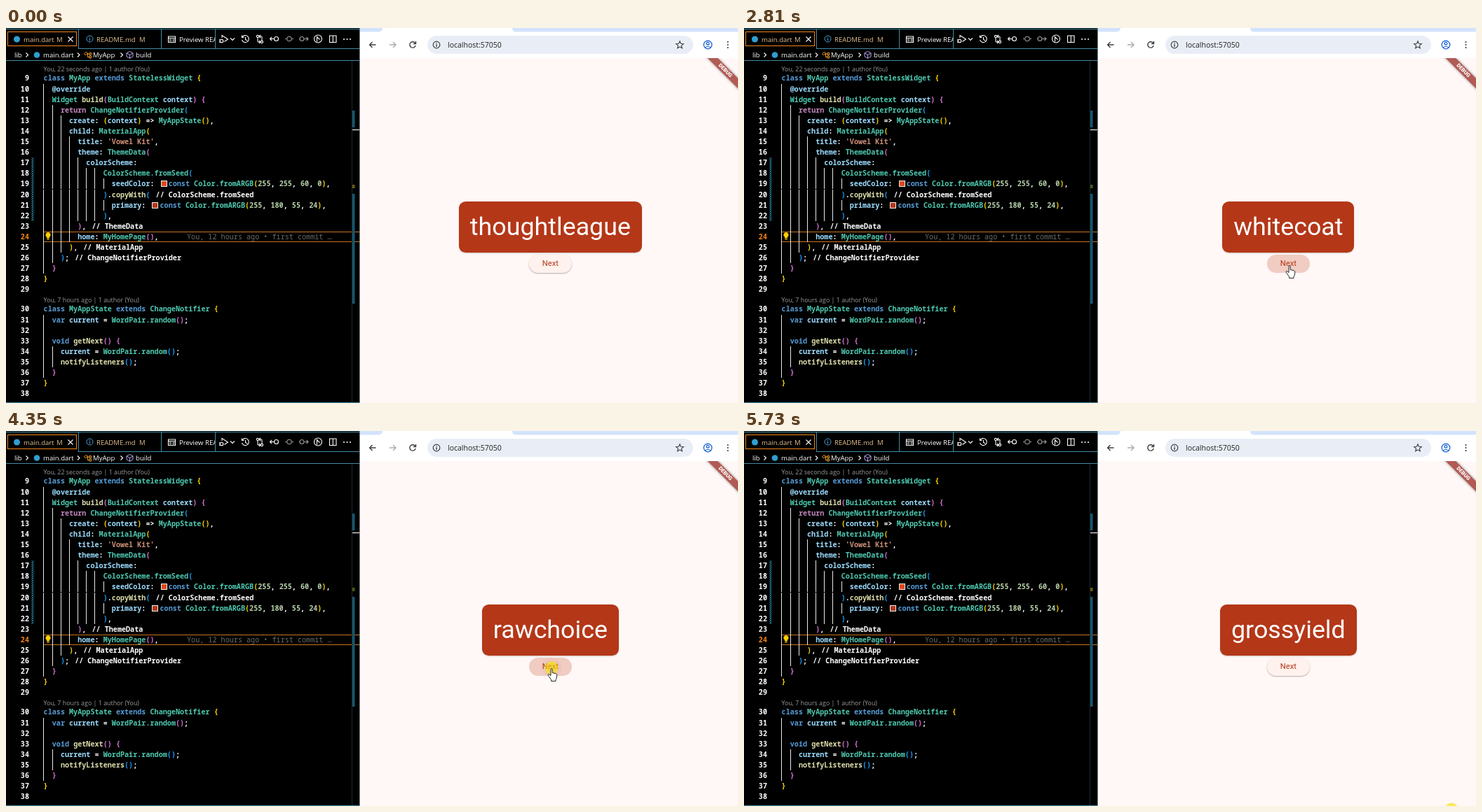
An HTML page for the animation above (5.92 s loop, 1044 px wide and 536 px high).

```html
<!DOCTYPE html>
<html lang="en">
<head>
<meta charset="utf-8">
<title>Word pair demo</title>
<style>
  html, body { margin: 0; width: 100%; height: 100%; overflow: hidden; background: #000; }
  #stage { position: relative; width: 1044px; height: 536px; overflow: hidden; background: #000; }
  #stage > * { position: absolute; }
  #code { left: 0; top: 0; }
  #code div { position: absolute; left: 53.6px; white-space: pre; color: #fff;
    font: 600 10.15px/15.1px "Noto Sans Mono", "DejaVu Sans Mono", monospace; }
  #code div.num { left: 0; width: 33px; text-align: right; font-weight: 700; }
  #code div.blame { left: 258px; color: #6a6a6a; font-weight: 500; }
  #code i { position: absolute; width: 1px; height: 15.1px; background: #e8e8e8; }
  #code .sw { display: inline-block; box-sizing: border-box; width: 9px; height: 9px;
    margin: 0 2px 0 3px; border: 1px solid #eee; vertical-align: -1px; }
  .kw { color: #569cd6; } .ret { color: #c586c0; } .type { color: #4ec9b0; }
  .fn { color: #dcdcaa; } .var { color: #9cdcfe; } .str { color: #ce9178; }
  .n { color: #b5cea8; } .b0 { color: #ffd700; } .b1 { color: #da70d6; } .b2 { color: #179fff; }
  .note { margin-left: 2px; }
  #page { left: 505px; top: 43px; width: 539px; height: 493px; background: #fff8f6; overflow: hidden; }
  #banner { position: absolute; left: 481px; top: 13.4px; width: 80px; height: 9.6px;
    transform: rotate(45deg); background: #b25a54; box-shadow: 0 0 4px rgba(0,0,0,.5);
    color: #fff; text-align: center; font: 900 7.6px/9.6px Roboto, sans-serif; }
  #app { left: 576.4px; top: 248px; width: 400px; display: flex; flex-direction: column; align-items: center; }
  #card { padding: 15.9px; border-radius: 9.6px; background: #b43718; color: #fff;
    box-shadow: 0 1px 2px rgba(0,0,0,.22); font: 400 35.8px/41.4px Roboto, sans-serif; }
  #next { position: relative; margin-top: 3.3px; width: 61.4px; height: 25.6px; border-radius: 13px;
    overflow: hidden; background: #fff1ed; color: #b43718; text-align: center;
    font: 400 11.2px/25.6px Roboto, sans-serif; }
  #tint, #ripple { position: absolute; background: #b43718; opacity: 0; }
  #tint { inset: 0; }
  #ripple { width: 72px; height: 72px; left: -3.4px; top: -22px; border-radius: 50%; }
  #pointer { left: 0; top: 0; overflow: visible; }
  svg text { font-family: "Open Sans", "Noto Sans", sans-serif; font-size: 9.6px; fill: #fff; }
  svg .lens { font-size: 8.9px; fill: #999; }
  svg .mod { fill: #e2c08d; }
  .line { fill: none; stroke: #fff; stroke-width: 1.1; }
  .dark { fill: none; stroke: #3c4043; stroke-width: 1.4; }
</style>
</head>
<body>
<div id="stage">
  <svg width="1044" height="536">
    <defs>
      <pattern id="hatch" width="3" height="3" patternUnits="userSpaceOnUse">
        <path d="M0 3L3 0" stroke="#2a9dc0" stroke-width="1.2"/>
      </pattern>
    </defs>

    <!-- editor frame and tabs -->
    <path d="M0 1.5H505M103 29.5H505M103.5 1V30M221.5 1V30M298.5 1V30M0 46.5H505M0 535.5H505" fill="none" stroke="#428ca4"/>
    <path d="M504.5 0V536" stroke="#7f9099"/>
    <rect x="2.500" y="5.500" width="98" height="20" fill="none" stroke="#f38518"/>
    <circle cx="15.500" cy="16" r="4.500" fill="#2f9fd0"/>
    <text class="mod" x="25" y="19.500">main.dart</text>
    <text class="mod" x="72" y="19.500">M</text>
    <path class="line" d="M88.500 12.500l7 7m0-7l-7 7"/>
    <circle cx="119.500" cy="15.500" r="4.500" fill="none" stroke="#4aa3d8"/>
    <path d="M119.500 13v1.200M119.500 15v3.300" stroke="#4aa3d8"/>
    <text class="mod" x="129" y="19.500">README.md</text>
    <text class="mod" x="190" y="19.500">M</text>
    <path class="line" d="M231.500 12h10v8.500h-10zM231.500 14.500h10M233 16.500h3m1.500 0h3M233 18.500h3m1.500 0h3"/>
    <svg x="224" y="2" width="74" height="27"><text x="23" y="17.500">Preview README.md</text></svg>

    <!-- editor actions -->
    <g class="line">
      <path d="M308 14v-3.500l8.500 5.500-5 3.500M320 14.500l3 3 3-3"/>
      <circle cx="307.500" cy="18.500" r="2.300"/><path d="M304 16.500l1.500 1M304 20.500l1.500-1"/>
      <path d="M337 13a5 5 0 1 1-.5 4M336.500 10.500v3h3M341.500 13v3.500l2.500 1.500"/>
      <circle cx="359" cy="12" r="1.600"/><circle cx="365" cy="20" r="1.600"/>
      <path d="M359 14v5q0 1 1 1h2.500m-1.500-2l2 2-2 2M365 18v-5q0-1-1-1h-2.500m1.500-2l-2 2 2 2"/>
      <circle cx="385.500" cy="15.500" r="3"/><path d="M382 15.500h-5m2-2.500l-2.500 2.500 2.500 2.500"/>
      <g stroke="#999"><circle cx="404" cy="15.500" r="3.200"/><path d="M398 15.500h2.500m7 0h2.500"/>
      <circle cx="422" cy="15.500" r="3"/><path d="M418 15.500h1m6.500 0h5m-2-2.500l2.500 2.500-2.500 2.500"/></g>
      <circle cx="445" cy="15.500" r="5.500"/><path d="M443.500 11.500v8M443.500 13l4 3.500"/>
      <path d="M461.500 11h9.500v9.500h-9.500zM466.300 11v9.500"/>
    </g>
    <path d="M482 16h.01m4.500 0h.01m4.500 0h.01" stroke="#fff" stroke-width="2" stroke-linecap="round"/>

    <!-- breadcrumb -->
    <text x="12" y="42">lib</text>
    <circle cx="44" cy="38.500" r="4.300" fill="#2f9fd0"/>
    <text x="53" y="42">main.dart</text>
    <text x="124" y="42">MyApp</text>
    <text x="185" y="42">build</text>
    <path class="line" d="M28.500 35.500l3 3-3 3M102 35.500l3 3-3 3M163.500 35.500l3 3-3 3"/>
    <path d="M111.500 37l3-3 2 2-3 3zM115 37h4.500M116.500 37v4.500h3M119 35.500h2.500v3H119zM119 40h2.500v3H119z" fill="none" stroke="#ee9d28"/>
    <path d="M176.500 33.500l4.500 2.300v5l-4.500 2.500-4.500-2.500v-5zM172 36l4.500 2.300 4.500-2.300M176.500 38.300v5" fill="none" stroke="#b9a3e8"/>

    <!-- editor margins -->
    <text class="lens" x="53.500" y="62">You, 22 seconds ago | 1 author (You)</text>
    <text class="lens" x="53.500" y="392.200">You, 7 hours ago | 1 author (You)</text>
    <rect x="36.500" y="185" width="3" height="91" fill="url(#hatch)"/>
    <path d="M53 291.500H504M53 305.500H504" stroke="#c87420"/>
    <path d="M493.500 47V535" stroke="#1c2a30"/>
    <path d="M494 118h3.500v24h-3.500zM494 237h3.500v157h-3.500z" fill="#17566e"/>
    <path d="M494 145.500h10" stroke="#ccc" stroke-width="1.500"/>
    <rect id="mark" x="494" y="224" width="3.500" height="5"/>

    <!-- browser chrome -->
    <path d="M505 0h539v43H505z" fill="#fff"/>
    <path d="M505 0h32q0 5-6 5.500H505zM722 0h322v5.500H728q-6 0-6-5.500z" fill="#d3e3fd"/>
    <rect x="601" y="11" width="379" height="26" rx="13" fill="#e9eef6"/>
    <g class="dark">
      <path d="M527.500 24h-9m4-4l-4 4 4 4"/>
      <path d="M547 24h9m-4-4l4 4-4 4" stroke="#a9acb0"/>
      <path d="M583.800 22a4.200 4.200 0 1 0 .3 3M584.500 19v3.500H581"/>
      <circle cx="614" cy="24" r="4.800" stroke-width="1.200"/>
      <path d="M614 21v1.300M614 23.300v3.700"/>
      <path d="M961 18.800l1.500 3.500 3.800.3-2.900 2.500.9 3.700-3.300-2-3.300 2 .9-3.700-2.900-2.500 3.800-.3z" stroke-width="1.100"/>
      <g stroke="#0b57d0" stroke-width="1.200"><circle cx="1001" cy="24" r="5.800"/><circle cx="1001" cy="22.300" r="1.900"/><path d="M997 28q4-3 8 0"/></g>
    </g>
    <path d="M1029.500 20v.01m0 4v.01m0 4v.01" stroke="#3c4043" stroke-width="2.200" stroke-linecap="round"/>
    <text x="630" y="27.700" style="font-size:10.5px;fill:#1f1f1f">localhost:57050</text>
  </svg>

  <div id="code"></div>
  <svg width="70" height="310"><path d="M60 292a3.700 3.700 0 0 0-2 6.800v1.700h4v-1.700a3.700 3.700 0 0 0-2-6.800zM58.300 301.200h3.400v1.300h-3.400z" fill="#ffcc00"/></svg>

  <div id="page"><div id="banner">DEBUG</div></div>
  <div id="app">
    <div id="card"></div>
    <div id="next">Next<div id="tint"></div><div id="ripple"></div></div>
  </div>
  <svg id="pointer" width="1" height="1">
    <circle id="halo" r="9.500" fill="rgba(245,225,0,.62)"/>
    <path id="arrow" d="M.5.5V13l2.900-2.700 2 4.400 1.900-.8-2-4.300h3.900z" fill="#fff" stroke="#111" stroke-width=".9"/>
    <path id="hand" d="M-1 2q1-2 2.200 0v5l5 1.200q1.800.6 1.600 2.400l-.8 5-1 1.400v2H-.4v-2L-4.600 11q-1-1.800.8-2l2.800 2z" fill="#fff" stroke="#111" stroke-width=".9"/>
  </svg>
</div>

<script>
const $ = id => document.getElementById(id);

/* ---------- code listing ---------- */
const listing = `class MyApp extends StatelessWidget {
  @override
  Widget build(BuildContext context) {
    return ChangeNotifierProvider(
      create: (context) => MyAppState(),
      child: MaterialApp(
        title: 'Vowel Kit',
        theme: ThemeData(
          colorScheme:
              ColorScheme.fromSeed(
                seedColor: ■const Color.fromARGB(255, 255, 60, 0),
              ).copyWith( // ColorScheme.fromSeed
                primary: ■const Color.fromARGB(255, 180, 55, 24),
              ),
        ), // ThemeData
        home: MyHomePage(),
      ), // MaterialApp
    ); // ChangeNotifierProvider
  }
}

class MyAppState extends ChangeNotifier {
  var current = WordPair.random();
  
  void getNext() {
    current = WordPair.random();
    notifyListeners();
  }
}
`.split('\n');

const CHAR = 6.09, ROW = 15.1;
const swatches = ['#e0481a', '#b43718'];
let depth = 0;

const span = (cls, s) => `<span class="${cls}">${s}</span>`;

function wordClass(word, after) {
  if (word === 'return') return 'ret';
  if (/^(class|extends|const|var|void)$/.test(word)) return 'kw';
  if (/^\d/.test(word)) return 'n';
  if (/^[A-Z]/.test(word)) return 'type';
  return after === '(' ? 'fn' : 'var';
}

function paint(line) {
  const token = /('[^']*')|(\/\/.*)|(@?\w+(?:\.\w+)?)|([({])|([)}])|■|=>/g;
  return line.replace(token, (s, str, note, word, open, close, at) => {
    if (str) return span('str', s);
    if (note) return span('note', s);
    if (word) return span(wordClass(word, line[at + s.length]), s);
    if (open) return span('b' + depth++ % 3, s);
    if (close) return span('b' + --depth % 3, s);
    if (s === '■') return `<span class="sw" style="background:${swatches.shift()}"></span>`;
    return '=&gt;';
  });
}

$('code').innerHTML = listing.map((line, i) => {
  const num = i + 9;
  const top = (num < 30 ? 64.4 + i * ROW : 394.4 + (num - 30) * ROW).toFixed(1);
  const indent = line.match(/^ */)[0].length;
  let html = `<div class="num" style="top:${top}px;${num === 24 ? 'color:#f38518' : ''}">${num}</div>`;
  for (let c = 0; c < indent; c += 2) {
    html += `<i style="left:${Math.round(53.4 + c * CHAR)}px;top:${top}px"></i>`;
  }
  html += `<div style="top:${top}px">${paint(line)}</div>`;
  if (num === 24) {
    html += `<div class="blame" style="top:${top}px">You, 12 hours ago • first commit …</div>`;
  }
  return html;
}).join('');

/* ---------- timeline (ms) ---------- */
const LOOP = 5920;
const words = ['thoughtleague', 'whitecoat', 'trackload', 'rawchoice', 'grossyield'];
const taps = [[2270, 2400], [2910, 3030], [3390, 3560], [4320, 4410]];
const presses = [[1360, 1560], ...taps, [5730, LOOP]];
// start, end, from x, y, to x, y
const moves = [
  [580, 740, 963, 503, 813, 310],
  [1840, 2020, 813, 310, 778, 338.5],
  [4750, 4950, 778, 338.5, 1000, 496],
  [5190, 5450, 1000, 496, 1002, 537],
  [5450, 5451, 1009, 541, 1009, 541]
];

const ramp = (t, a, b) => Math.min(1, Math.max(0, (t - a) / (b - a)));
const smooth = k => k * k * (3 - 2 * k);
const mix = (a, b, k) => a + (b - a) * k;
const show = (id, on) => { $(id).style.visibility = on ? 'visible' : 'hidden'; };

function pointer(t) {
  const m = moves.filter(m => t >= m[0]).pop();
  const [a, b, x0, y0, x1, y1] = m || moves[0];
  const k = smooth(ramp(t, a, b));
  const x = mix(x0, x1, k), y = mix(y0, y1, k);
  const over = x > 745 && x < 807 && y > 324.5 && y < 350.5;
  $('pointer').style.transform = `translate(${x}px,${y}px)`;
  show('arrow', m && !over);
  show('hand', m && over);
  show('halo', presses.some(([p, r]) => t >= p && t < r));
}

function button(t) {
  const leave = 1 - ramp(t, 4780, 4930);
  const hover = ramp(t, 1930, 2020) * leave;
  const held = ramp(t, 2340, 2480) * leave;
  $('tint').style.opacity = 0.08 * hover + 0.12 * held;
  const lift = hover * (1 - held);
  const flat = 0.3 * (1 - held);
  $('next').style.boxShadow = `0 ${1 + lift * .6}px ${2 + lift * 1.5}px rgba(0,0,0,${flat})`;

  const tap = taps.filter(([p]) => t >= p).pop();
  let size = 0, alpha = 0;
  if (tap) {
    const [p, r] = tap;
    const slow = 13 + 24 * (Math.min(t, r) - p) / 600;
    size = mix(slow, 36, smooth(ramp(t, r, r + 225)));
    alpha = 0.1 * ramp(t, p, p + 75) * (1 - ramp(t, r + 150, r + 375));
  }
  $('ripple').style.transform = `scale(${size / 36})`;
  $('ripple').style.opacity = alpha;
}

function draw(t) {
  const word = words[taps.filter(([, r]) => t >= r).length];
  if ($('card').textContent !== word) $('card').textContent = word;
  $('mark').style.fill = t >= 1360 && t < 5730 ? '#4a5a14' : '#6b5a10';
  pointer(t);
  button(t);
}

const start = performance.now();
function tick() {
  draw((performance.now() - start) % LOOP);
  requestAnimationFrame(tick);
}
tick();
</script>
</body>
</html>
```
